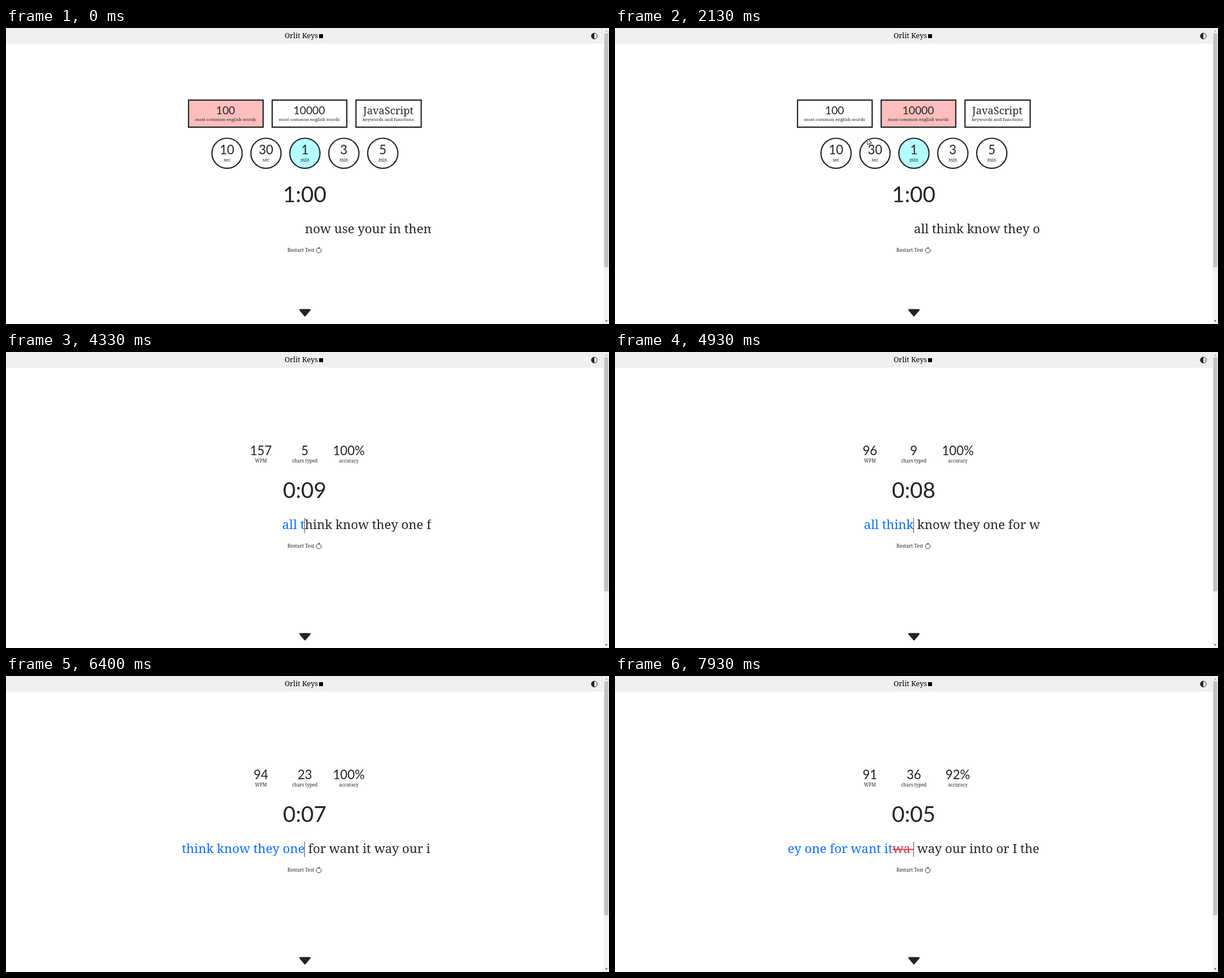
Animation of 1067x525 px, one loop 8 s. Source, as an HTML page with a canvas:

```html
<!DOCTYPE html>
<html lang="en">
<head>
<meta charset="utf-8">
<title>Typing test</title>
<style>
  html, body { margin: 0; width: 100%; height: 100%; overflow: hidden; background: #fff; }
  canvas { display: block; width: 1067px; height: 525px; }
</style>
</head>
<body>
<canvas id="stage"></canvas>
<script>
const W = 1067, H = 525, MID = 529;
const LOOP = 8000, FRAME = 1000 / 15;
const INK = '#212529', BLUE = '#0d6efd', RED = '#dc3545';
const SERIF = '"Noto Serif", serif', DIGITS = 'Lato, sans-serif';

const canvas = document.getElementById('stage');
const ctx = canvas.getContext('2d');
const dpr = window.devicePixelRatio || 1;
canvas.width = W * dpr;
canvas.height = H * dpr;

const FIRST_LINE = 'now use your in them and';
const LINE = 'all think know they one for want it way our into or I the some';
const TYPO = 'wa ';
const GOOD = LINE.indexOf(' way');   // correct keystrokes before the typo

// clicks, then a steady typing beat with one hesitation
const PICK_LIST = 1730, PICK_TIME = 2660, START = 3926;
const BEAT = 103.5, PAUSE = 172, PAUSE_KEY = 9;
const CLOCK_START = 4030, SECOND = 840;

// start and end of each pointer move, and where it leads
const moves = [
  [600, 1200, 559, 129],
  [1400, 1470, 545, 144],
  [1870, 2530, 391, 226],
  [2690, 3200, 258, 506]
];

const lists = [
  { x: 322, w: 134, name: '100', note: 'most common english words' },
  { x: 470, w: 134, name: '10000', note: 'most common english words' },
  { x: 618.3, w: 117.4, name: 'JavaScript', note: 'keywords and functions' }
];
const durations = [['10', 'sec'], ['30', 'sec'], ['1', 'min'], ['3', 'min'], ['5', 'min']];

const clamp = v => Math.min(1, Math.max(0, v));
const easeOut = v => 1 - (1 - v) ** 2;

function keyTime(n) {
  const time = START + BEAT * (n - 1) + (n >= PAUSE_KEY ? PAUSE : 0);
  return Math.round(time / FRAME) * FRAME;
}

function keysTyped(t) {
  let n = 0;
  while (n < GOOD + TYPO.length && keyTime(n + 1) <= t) n++;
  return n;
}

function pointerAt(t) {
  if (t < moves[0][0] || t >= moves[moves.length - 1][1]) return null;
  let x = 238, y = 512;
  for (const [from, to, nx, ny] of moves) {
    const f = easeOut(clamp((t - from) / (to - from)));
    x += (nx - x) * f;
    y += (ny - y) * f;
  }
  return { x, y };
}

// visible after a click, fades out and comes back
function caretAlpha(t) {
  if (t < PICK_LIST) return 0;
  const phase = t - (t < PICK_TIME ? PICK_LIST : PICK_TIME);
  return 0.8 * clamp((Math.abs(phase - 575) - 145) / 290);
}

function clockText(t) {
  if (t < PICK_TIME) return '1:00';
  const left = Math.min(10, 9 - Math.floor((t - CLOCK_START) / SECOND));
  return '0:' + String(left).padStart(2, '0');
}

function text(str, x, y, size, { font = SERIF, align = 'center', color = INK } = {}) {
  ctx.font = `${size}px ${font}`;
  ctx.textAlign = align;
  ctx.fillStyle = color;
  ctx.fillText(str, x, y);
}

const number = (str, x, y, size) => text(str, x, y, size, { font: DIGITS });

function box(x, y, w, h, color) {
  ctx.fillStyle = color;
  ctx.fillRect(x, y, w, h);
}

function paint(fill, stroke, width = 1) {
  if (fill) { ctx.fillStyle = fill; ctx.fill(); }
  if (stroke) { ctx.strokeStyle = stroke; ctx.lineWidth = width; ctx.stroke(); }
}

function shape(points, fill, stroke, width) {
  ctx.beginPath();
  points.forEach(([x, y]) => ctx.lineTo(x, y));
  ctx.closePath();
  paint(fill, stroke, width);
}

function arc(x, y, r, from, to, fill, stroke, width) {
  ctx.beginPath();
  ctx.arc(x, y, r, from, to);
  paint(fill, stroke, width);
}

function drawPage() {
  box(0, 0, W, H, '#fff');
  box(0, 0, W, 27.8, '#efefef');
  text('Orlit Keys', 522.5, 18, 12.6, { color: '#000' });
  box(554, 11, 7, 7, '#000');

  // contrast switch
  arc(1041, 14.3, 5.2, 0, Math.PI * 2, null, INK);
  arc(1041, 14.3, 5.2, Math.PI / 2, Math.PI * 1.5, INK);

  // scrollbar
  box(1057.6, 0, 9.4, H, '#f1f1f1');
  box(1058.7, 9.4, 7.2, 415, '#c1c1c1');
  shape([[1060, 6.5], [1062.3, 4], [1064.6, 6.5]], '#a3a3a3');
  shape([[1060, 518.5], [1062.3, 521], [1064.6, 518.5]], '#505050');

  ctx.lineJoin = 'round';
  shape([[520.5, 500], [537.5, 500], [529, 510]], INK, INK, 3);
  ctx.lineJoin = 'miter';
}

function drawRestart(y) {
  text('Restart Test', 498, y + 3, 8.6, { align: 'left' });
  arc(553.5, y + 0.6, 4.4, -0.85, Math.PI * 1.5, null, INK);
  shape([[553.3, y - 5.7], [555.9, y - 3.7], [553.3, y - 1.7]], INK);
}

// returns whether the pointer is over a button
function drawMenu(t, pointer) {
  const list = t < PICK_LIST ? 0 : 1;
  const time = t < PICK_TIME ? 2 : 0;
  let hot = false;

  lists.forEach(({ x, w, name, note }, i) => {
    const over = pointer && pointer.x > x && pointer.x < x + w &&
      pointer.y > 127 && pointer.y < 177;
    hot = hot || over;
    ctx.beginPath();
    ctx.rect(x + 1, 127.8, w - 2, 48);
    paint(i === list ? '#ffbdbd' : over ? '#ffe3e3' : '#fff', INK, 2.2);
    const cx = x + w / 2 - 0.5;
    if (isNaN(name)) text(name, cx, 152.6, 18.3);
    else number(name, cx, 152.6, 19.4);
    text(note, cx, 165, 7.9);
  });

  durations.forEach(([value, unit], i) => {
    const cx = 391.1 + i * 68.9, cy = 222.2;
    const over = pointer && Math.hypot(pointer.x - cx, pointer.y - cy) < 27.8;
    hot = hot || over;
    const fill = i === time ? '#b5ffff' : over ? '#e1ffff' : '#fff';
    arc(cx, cy, 26.7, 0, Math.PI * 2, fill, INK, 2.2);
    number(value, cx, 224, 22.2);
    text(unit, cx, 237, 8);
  });
  return hot;
}

function drawStats(keys) {
  const wrong = Math.max(0, keys - GOOD);
  const chars = Math.min(keys, GOOD) + (wrong === TYPO.length ? 1 : 0);
  const x = (keyTime(keys) - CLOCK_START) / 1000;
  const elapsed = x * (1.26 - 0.0103 * x);
  const wpm = elapsed > 0 ? Math.round(chars * 12 / elapsed) : 0;
  const accuracy = Math.round(100 * Math.min(keys, GOOD) / keys);
  const stats = [[wpm, 'WPM'], [chars, 'chars typed'], [accuracy + '%', 'accuracy']];
  stats.forEach(([value, label], i) => {
    const cx = 451 + i * 77.8;
    number(String(value), cx, 183, 22.2);
    text(label, cx, 196, 8.1);
  });
}

function drawWords(line, keys, y, caret) {
  const good = Math.min(keys, GOOD);
  const typo = TYPO.slice(0, keys - good);
  const size = 22.1;
  ctx.save();
  ctx.beginPath();
  ctx.rect(306, y - 30, 446, 50);
  ctx.clip();
  text(line.slice(good), MID, y, size, { align: 'left' });
  const typoWidth = ctx.measureText(typo).width;
  const left = MID - 0.5 - typoWidth;
  text(line.slice(0, good), left, y, size, { align: 'right', color: BLUE });
  text(typo, left, y, size, { align: 'left', color: RED });
  box(left, y - 7, typoWidth, 2, RED);
  ctx.restore();
  ctx.globalAlpha = caret;
  box(528, Math.round(y) - 20, 1, 27, INK);
  ctx.globalAlpha = 1;
}

function drawPointer({ x, y }, hand) {
  ctx.save();
  ctx.translate(x, y);
  ctx.lineJoin = 'round';
  if (hand) {
    shape([[-1, 1], [0, 0], [1, 1], [1, 5], [3, 5], [5, 6], [6, 7], [6, 10], [5, 13],
      [-1, 13], [-4, 8], [-3.5, 7], [-1, 9]], '#fff', '#222', 0.9);
    ctx.beginPath();
    for (const dx of [1, 3, 4.7]) { ctx.moveTo(dx, 5.5); ctx.lineTo(dx, 7.5); }
    ctx.stroke();
  } else {
    shape([[0, 0], [0, 11], [2.6, 8.7], [4.2, 12.4], [5.8, 11.7], [4.2, 8.2], [7.6, 8]],
      '#fff', '#222', 0.9);
  }
  ctx.restore();
}

function render(t) {
  ctx.setTransform(dpr, 0, 0, dpr, 0, 0);
  const running = t >= START;
  const lift = running ? 50 : 0;
  const keys = keysTyped(t);
  const pointer = pointerAt(t);
  let hot = false;

  drawPage();
  if (running) drawStats(keys);
  else hot = drawMenu(t, pointer);
  number(clockText(t), MID - 0.5, 308.8 - lift, 38.8);
  drawWords(t < PICK_LIST ? FIRST_LINE : LINE, keys, 363.6 - lift, caretAlpha(t));
  drawRestart(394 - lift);
  if (pointer) drawPointer(pointer, hot);
}

function tick() {
  const now = (performance.now() + 5) % LOOP;
  render(Math.floor(now / FRAME) * FRAME);
  requestAnimationFrame(tick);
}
tick();
</script>
</body>
</html>
```
